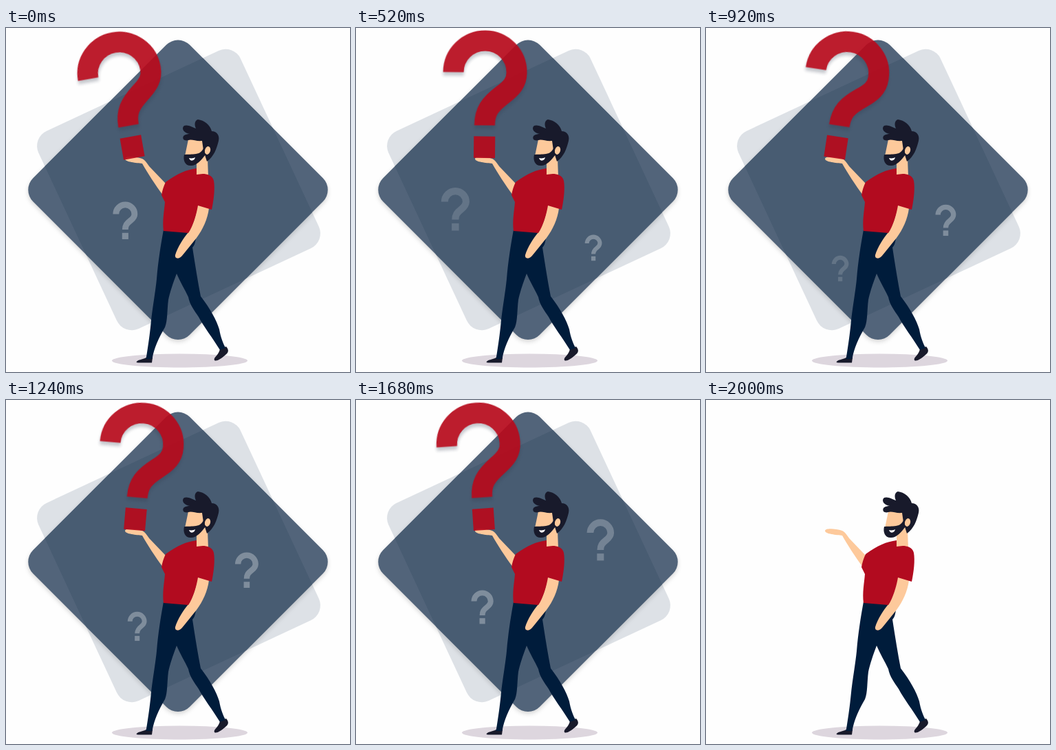
Recreate the animation shown at these times as an HTML page. Size 500 by 500 pixels, loop 2.04 s.

```html
<!DOCTYPE html>
<html lang="en">
<head>
<meta charset="utf-8">
<title>Man with question marks</title>
<style>
html, body { margin: 0; width: 100%; height: 100%; overflow: hidden; background: #fefefe; }
svg { display: block; width: 100%; height: 100%; }
#diamond { filter: drop-shadow(0 3px 3px rgba(0, 0, 0, .16)); }
#shaded { filter: drop-shadow(0 5px 2px rgba(50, 60, 80, .3)); }
</style>
</head>
<body>
<svg viewBox="0 0 500 500">
  <defs>
    <rect id="square" x="-161" y="-161" width="322" height="322" rx="24" transform="translate(250 235.300) rotate(45)"/>
    <rect id="tilted" x="-162" y="-158.500" width="324" height="317" rx="24" transform="translate(251 235) rotate(-25)"/>
    <clipPath id="inDiamond"><use href="#square"/></clipPath>
    <path id="hook" d="M140.500 64.500A46 46 0 0 1 232.500 64.500C232.500 79 225 87 212 97C194 111 186.500 121 186.500 141.500" fill="none" stroke-width="30"/>
    <path id="dot" d="M171 157.500h31v31.500h-31z" stroke="none"/>
    <!-- question mark, centred on its own box -->
    <g id="mark" transform="translate(-186.500 -96.500)"><use href="#hook"/><use href="#dot"/></g>
    <path id="leftPath" d="M198 362C183 300 185 264 131 262"/>
    <path id="rightPath" d="M332 370C360 290 338 270 362 172"/>
  </defs>

  <g id="scene">
    <use href="#tilted" fill="#dde1e6"/>
    <g id="diamond"><use href="#square" fill="#52647a"/></g>
    <g clip-path="url(#inDiamond)"><use href="#tilted" fill="#485c72"/></g>
    <use id="left" href="#mark" fill="#fff" stroke="#fff"/>
    <use id="right" href="#mark" fill="#fff" stroke="#fff"/>
  </g>

  <ellipse cx="252.500" cy="483.500" rx="98.500" ry="10" fill="#ddd6de"/>

  <g fill="#fdc99b">
    <path d="M173 190C174 186 188 187 198 190C204 193 206 199 210 203L232 226L228 243C217 228 206 211 198 197C190 196 173 195 173 190Z"/>
    <path d="M265 162C272 161 280 159 285 163L290 176L293 190L294 216L277 214V196L260 186Z"/>
  </g>
  <g fill="#181a2b">
    <path d="M258 162C255 156 262 154 267 154C259 153 254 146 259 142C264 140 271 144 276 146C273 139 275 134 279 133C288 134 297 141 299 150C306 150 311 156 309 164C306 176 302 187 292 194L287 178L285 164C276 165 270 161 265 163C262 164 259 163 258 162Z"/>
    <path d="M259 184C264 183 275 185 282 181C286 178 287 175 288 172L290 184C284 192 276 201 268 200C260 200 257 192 259 184Z"/>
    <path d="M189.500 486C190 482 199 482 204 479H213L212 486.500H192Z"/>
    <path d="M311 467L320 463C325 469 323 472 318 476C312 481 306 485 303 483C301 479 308 477 311 467Z"/>
  </g>
  <ellipse cx="293" cy="178" rx="4" ry="6" transform="rotate(15 293 178)" fill="#fdc99b"/>
  <path d="M266 189C270 190 273 189 275 188C274 193 268 195 266 189Z" fill="#fff"/>

  <path d="M229 293L266 297L276 305C275 312 274 316 271 319C275 345 279 370 283 390C297 408 306 425 310 438C312 450 316 459 319 465L311 468C300 450 288 435 280 420C274 411 267 402 265 391C260 380 253 369 248 357C243 370 238 385 236 395C234 410 235 425 231 435C222 450 215 466 212.500 481H203.500C207 460 209 445 210.500 430C213 405 217 385 219 365C221 340 225 315 229 293Z" fill="#001c3b"/>
  <path d="M278 256L295 262C293 278 286 293 277 305C268 316 262 324 256 331C252 336 245 336 246 330C249 319 259 304 265 297C272 286 277 272 278 256Z" fill="#fdc99b"/>
  <path d="M277 204C262 206 250 211 232 224C229 230 227 237 226 243L231 253C230 266 227 280 229 295L265 298C272 288 277 270 279 258L299 264C302 250 304 233 302 222C300 214 292 212 286 212L277 213Z" fill="#b20b1f"/>

  <g id="big" opacity=".92" fill="#b70a1c" stroke="#b70a1c">
    <g id="shaded"><use href="#hook"/></g>
    <use href="#dot"/>
  </g>
</svg>
<script>
const LOOP = 2040, STEP = 40, SWING = 990;
const $ = id => document.getElementById(id);
const clamp = v => Math.max(0, Math.min(1, v));

// Rises along a path at constant speed, growing, fading in and out.
function drift(id, path, p, from, to) {
  const at = path.getPointAtLength(path.getTotalLength() * p);
  const scale = (from + (to - from) * p) / 185;
  $(id).setAttribute('transform', `translate(${at.x} ${at.y}) scale(${scale})`);
  $(id).setAttribute('opacity', .3 * Math.min(clamp(p / .2), clamp((1 - p) / .2)));
}

function draw(now) {
  const t = Math.floor(now % LOOP / STEP) * STEP;
  const shown = t < 2000 ? 'visible' : 'hidden';
  $('scene').style.visibility = $('big').style.visibility = shown;
  const angle = 10 - 20 * Math.abs(t - SWING) / SWING;
  $('big').setAttribute('transform', `rotate(${angle} 186.5 190)`);
  drift('left', $('leftPath'), (t - 725 + LOOP) % LOOP / LOOP, 34.3, 65.4);
  drift('right', $('rightPath'), clamp(t / 2000), 27.5, 66);
  requestAnimationFrame(draw);
}
draw(0);
</script>
</body>
</html>
```
